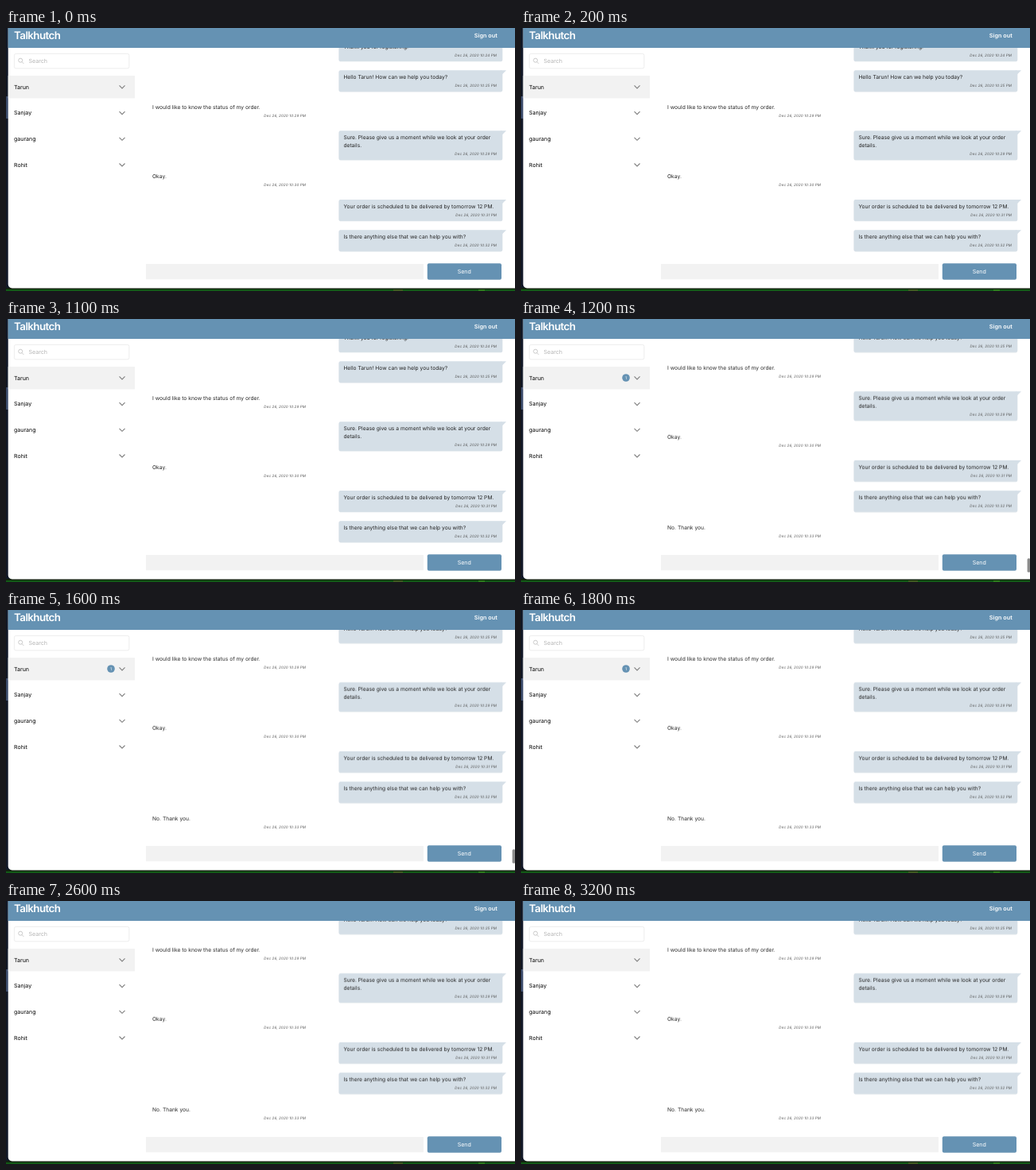
Recreate the animation shown at these times as an HTML page. Size 640x331 px, loop 3.5 s.

```html
<!DOCTYPE html>
<html lang="en">
<head>
<meta charset="utf-8">
<title>Support chat</title>
<style>
  html, body { margin: 0; width: 100%; height: 100%; overflow: hidden; background: #fff; }
  svg { display: block; width: 640px; height: 331px; }
  text {
    font: 6.67px Inter, "Open Sans", sans-serif;
    letter-spacing: .003em;
    fill: #222;
    text-rendering: geometricPrecision;
    white-space: pre;
  }
  .brand { font-size: 13.3px; font-weight: 600; letter-spacing: -.04em; fill: #fff; }
  .signout { font-size: 7.2px; font-weight: 600; letter-spacing: .01em; fill: #fff; }
  .contact { font-size: 7px; fill: #000; }
  .hint { font-size: 7.1px; fill: #b4b4b4; }
  .send { font-size: 7.1px; fill: #fff; text-anchor: middle; }
  .count { font-size: 5px; fill: #fff; text-anchor: middle; }
  .time { font-size: 4.55px; font-style: italic; letter-spacing: .025em; fill: #555; text-anchor: end; }
  .blue { fill: #6592b3; }
  .grey { fill: #f2f2f2; }
  .bubble { fill: #d5dfe7; }
  .shade { fill: #c3cfd9; opacity: .6; }
  .line { fill: none; stroke: #808080; stroke-width: 1.15; }
</style>
</head>
<body>
<svg viewBox="0 0 640 331">
  <defs>
    <clipPath id="view"><rect x="163" y="25" width="477" height="266"/></clipPath>
  </defs>

  <rect width="640" height="331" fill="#111827"/>
  <rect y="86" width="3" height="28" fill="#3a4a6a"/>
  <rect y="327" width="640" height="2" fill="#12240f"/>
  <rect y="329" width="640" height="2" fill="#125a16"/>
  <rect x="487" y="329" width="12" height="2" fill="#3f5a20"/>
  <rect x="594" y="329" width="8" height="2" fill="#2c7a1c"/>
  <path d="M2.7 0H640V327.5H7.7a5 5 0 0 1-5-5Z" fill="#fff"/>

  <g clip-path="url(#view)"><g id="thread"></g></g>

  <rect class="blue" x="2.7" width="638" height="25"/>
  <text class="brand" x="10" y="14">Talkhutch</text>
  <text class="signout" x="588.7" y="11.7">Sign out</text>

  <rect x="10.4" y="32.4" width="144.4" height="18.4" rx="2" fill="#fff" stroke="#e9e9e9" stroke-width=".8"/>
  <g fill="none" stroke="#bdbdbd" stroke-width=".8">
    <circle cx="18.2" cy="40.7" r="2.5"/><path d="M20 42.6l2.3 2.3"/>
  </g>
  <text class="hint" x="28.4" y="44.1">Search</text>

  <rect class="grey" x="2.7" y="60" width="159.3" height="28.4"/>
  <g id="contacts"></g>
  <g id="badge">
    <circle class="blue" cx="132" cy="74" r="4.8"/>
    <text class="count" x="132" y="75.8">1</text>
  </g>

  <rect class="grey" x="176" y="297" width="349" height="19.3"/>
  <rect class="blue" x="529.8" y="296.2" width="93.2" height="20.6" rx="2"/>
  <text class="send" x="576.3" y="309.2">Send</text>

  <rect id="thumb" x="636.6" y="301.2" width="3.8" height="17.6" rx="1.5" fill="#8c8c8c"/>
</svg>

<script>
const LOOP = 3500;
const contacts = ['Tarun', 'Sanjay', 'gaurang', 'Rohit'];

// [side, top, minute after 10 PM, lines]
const messages = [
  ['out', 15, 24, 'Thank you for registering.'],
  ['out', 53.2, 25, 'Hello Tarun! How can we help you today?'],
  ['in', 91.4, 29, 'I would like to know the status of my order.'],
  ['out', 129.3, 29, 'Sure. Please give us a moment while we look at your order', 'details.'],
  ['in', 177.8, 30, 'Okay.'],
  ['out', 216, 31, 'Your order is scheduled to be delivered by tomorrow 12 PM.'],
  ['out', 254.2, 32, 'Is there anything else that we can help you with?'],
  ['in', 292.2, 33, 'No. Thank you.']
];

const $ = id => document.getElementById(id);

function add(parent, tag, attrs, text = '') {
  const node = document.createElementNS('http://www.w3.org/2000/svg', tag);
  for (const key in attrs) node.setAttribute(key, attrs[key]);
  node.textContent = text;
  return parent.appendChild(node);
}

function addMessage([side, top, minute, ...lines]) {
  const thread = $('thread');
  const out = side === 'out';
  const extra = (lines.length - 1) * 10;
  if (out) {
    const box = { x: 418.6, width: 205.6, height: 26.6 + extra, rx: 1.8 };
    add(thread, 'rect', { ...box, y: top + .6, class: 'shade' });
    add(thread, 'rect', { ...box, y: top, class: 'bubble' });
    add(thread, 'path', { d: `M622 ${top}h7l-5 5h-2z`, class: 'bubble' });
  }
  lines.forEach((line, i) =>
    add(thread, 'text', { x: out ? 424.4 : 184, y: top + 10.9 + i * 10 }, line));
  add(thread, 'text', { x: out ? 617 : 377, y: top + 20.7 + extra, class: 'time' },
    `Dec 26, 2020 10:${minute} PM`);
}

contacts.forEach((name, i) => {
  const y = 76.6 + i * 32.7;
  add($('contacts'), 'text', { x: 10, y, class: 'contact' }, name);
  add($('contacts'), 'path', { d: `M142.5 ${y - 4.2}l3.5 3.5 3.5-3.5`, class: 'line' });
});
messages.forEach(addMessage);

const start = document.timeline.currentTime;

// Each step [ms, value] holds until the next one.
function hold(id, property, steps) {
  const frames = [...steps, [LOOP, steps.at(-1)[1]]].map(([ms, value]) =>
    ({ offset: ms / LOOP, [property]: value, easing: 'steps(1, end)' }));
  $(id).animate(frames, { duration: LOOP, iterations: Infinity }).startTime = start;
}

hold('thread', 'transform', [[0, 'translateY(0px)'], [1200, 'translateY(-38.2px)']]);
hold('badge', 'opacity', [[0, 0], [1200, 1], [2100, 0]]);
hold('thumb', 'opacity', [[0, 0], [1200, 1], [1700, .45], [1800, 0]]);
</script>
</body>
</html>
```
